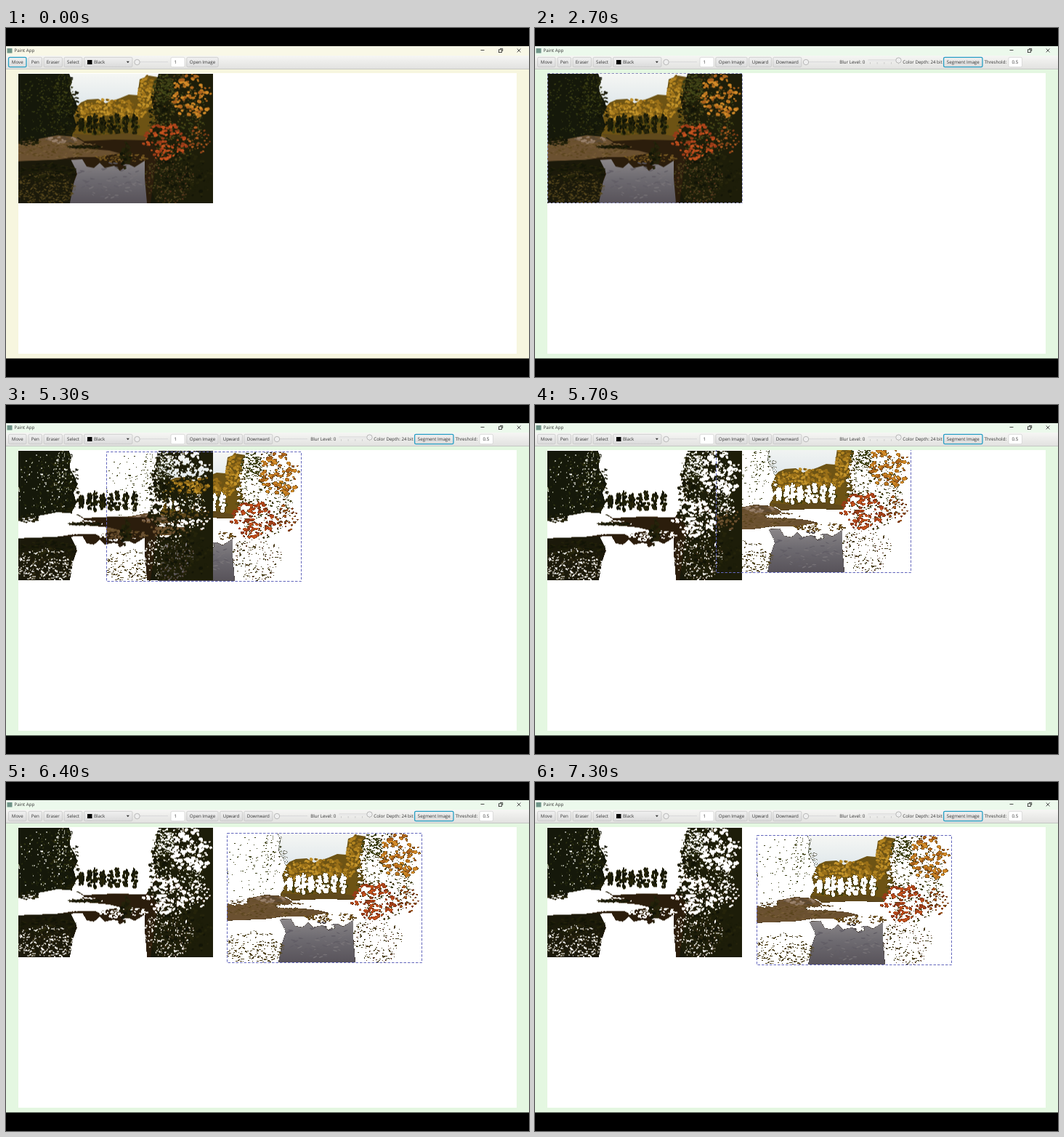
These frames come from a looping animation (720x480 px, 7700 ms). An HTML page with a canvas:

```html
<!DOCTYPE html>
<html lang="en">
<head>
<meta charset="utf-8">
<title>Paint App</title>
<style>
html, body { margin: 0; width: 100%; height: 100%; overflow: hidden; background: #000; }
canvas { display: block; }
</style>
</head>
<body>
<canvas id="stage" width="720" height="480"></canvas>
<script>
const LOOP = 7700, W = 268, H = 178, LEFT = 17, TOP = 62;
const g = document.getElementById('stage').getContext('2d');

let seed = 7;
function rand() {
  seed = (seed * 1664525 + 1013904223) >>> 0;
  return seed / 4294967296;
}

function newLayer() {
  const c = document.createElement('canvas');
  c.width = W;
  c.height = H;
  return c;
}

// Autumn lake: flat areas with leaf specks scattered in ellipses.
function paintPhoto() {
  const c = newLayer(), p = c.getContext('2d', { willReadFrequently: true });
  function area(color, ...pts) {
    p.fillStyle = color;
    p.beginPath();
    for (let i = 0; i < pts.length; i += 2) p.lineTo(pts[i], pts[i + 1]);
    p.fill();
  }
  function specks(n, x, y, rx, ry, colors, size, flat = 0.6) {
    for (let i = 0; i < n; i++) {
      const a = rand() * 2 * Math.PI, d = Math.sqrt(rand()), s = size * (0.4 + 0.6 * rand());
      p.fillStyle = colors[Math.floor(rand() * colors.length)];
      p.beginPath();
      p.ellipse(x + rx * d * Math.cos(a), y + ry * d * Math.sin(a), s, s * flat, rand() - 0.5, 0, 7);
      p.fill();
    }
  }
  const dark = ['#121407', '#1c1d09', '#25240b'];
  const green = ['#3f4417', '#494b1b', '#353b14'];
  const gold = ['#9a7019', '#b38420', '#7d5b14', '#c2932b'];
  const brown = ['#67502a', '#7a5f39', '#574219'];

  p.fillStyle = '#17180a';
  p.fillRect(0, 0, W, H);
  const sky = p.createLinearGradient(0, 0, 0, 45);
  sky.addColorStop(0, '#f6f7f4');
  sky.addColorStop(1, '#dfe7eb');
  area(sky, 69, 0, 195, 0, 190, 60, 75, 60, 80, 40, 72, 26);

  // Far trees
  area('#6d5314', 77, 50, 86, 40, 95, 36, 110, 35, 120, 41, 140, 34, 152, 29, 164, 30,
    167, 8, 180, 3, 192, 5, 192, 88, 74, 88);
  specks(330, 126, 52, 50, 17, gold, 2.6, 0.8);
  specks(130, 178, 27, 13, 24, gold, 2.5, 0.8);
  specks(150, 124, 73, 42, 14, ['#54430f', '#624d14', '#41400f'], 3, 1);
  for (const x of [86, 98, 106, 116, 127, 136, 148, 160])
    specks(34, x, 70, 4, 16 - rand() * 6, dark, 2, 1.4);

  // Left conifers
  area('#15180a', 0, 0, 70, 0, 74, 12, 68, 25, 76, 36, 82, 46, 76, 58, 80, 72, 72, 88, 0, 92);
  specks(130, 63, 46, 20, 48, dark, 3.2, 0.4);
  specks(220, 37, 48, 40, 46, green, 1.7, 0.45);
  specks(160, 62, 30, 14, 32, green, 1.5, 0.45);

  // Right wood
  area('#1d1d09', 193, 0, 268, 0, 268, 178, 190, 178, 174, 140, 172, 94, 190, 70, 184, 40);
  specks(160, 196, 52, 15, 48, dark, 3, 0.5);
  specks(480, 218, 60, 40, 60, ['#50491a', '#434819', '#5c4418'], 1.8);
  specks(130, 200, 20, 14, 19, green, 2);

  // Shore and water
  area('#2b1d0c', 70, 92, 115, 88, 176, 90, 192, 105, 182, 178, 70, 178, 55, 112);
  area('#60491c', 74, 83, 110, 85, 150, 82, 178, 87, 175, 92, 132, 91, 90, 93);
  area('#6b5131', 0, 94, 28, 90, 54, 85, 78, 87, 91, 95, 76, 102, 125, 106, 140, 110,
    108, 115, 76, 115, 52, 119, 0, 121);
  specks(220, 54, 104, 62, 12, brown, 3, 0.3);
  specks(35, 58, 91, 22, 4, ['#88715b', '#9a826c', '#5c4932'], 3.5, 0.5);
  specks(60, 14, 94, 15, 5, dark, 2.5, 0.45);
  specks(75, 92, 101, 24, 2, dark, 3, 0.3);
  specks(90, 142, 116, 37, 6, ['#60461a', '#806025', '#6d5120'], 2.5, 0.4);
  const water = p.createLinearGradient(0, 118, 0, 178);
  water.addColorStop(0, '#8b8789');
  water.addColorStop(0.45, '#6e6b71');
  water.addColorStop(1, '#58535a');
  area(water, 72, 119, 88, 118, 94, 128, 104, 130, 112, 123, 119, 130, 132, 127, 140, 134,
    152, 125, 160, 129, 174, 120, 174, 144, 177, 178, 70, 178, 76, 151, 81, 138);
  specks(70, 126, 147, 46, 25, ['#777377', '#625e66'], 4, 0.25);
  specks(40, 148, 113, 7, 18, dark, 3, 0.8);

  // Near grass and bushes
  area('#1b190a', 0, 121, 72, 118, 80, 134, 76, 152, 71, 178, 0, 178);
  specks(350, 36, 158, 43, 24, ['#57481c', '#655225', '#493f1a'], 2.2, 0.32);
  specks(110, 40, 136, 42, 13, dark, 4, 0.3);
  specks(350, 208, 145, 34, 35, ['#48401b', '#5c3920', '#544922'], 1.6, 0.6);
  specks(120, 232, 141, 35, 35, dark, 3, 0.7);

  // Coloured leaves
  specks(100, 240, 31, 30, 31, ['#bd7620', '#d28a28', '#aa611b'], 3.2, 0.75);
  specks(115, 203, 94, 31, 25, ['#ae451b', '#c4521e', '#963b18'], 3, 0.7);
  specks(35, 246, 92, 19, 18, ['#8b4219', '#ae5c20'], 2.4, 0.7);
  return c;
}

// Splits the photo by brightness into [light, dark] layers.
function segment(photo, threshold) {
  const data = photo.getContext('2d').getImageData(0, 0, W, H);
  return [false, true].map(wantDark => {
    const out = new ImageData(new Uint8ClampedArray(data.data), W, H), d = out.data;
    for (let i = 0; i < d.length; i += 4) {
      const lum = 0.3 * d[i] + 0.59 * d[i + 1] + 0.11 * d[i + 2];
      if ((lum < threshold) !== wantDark) d[i + 3] = 0;
    }
    const c = newLayer();
    c.getContext('2d').putImageData(out, 0, 0);
    return c;
  });
}

const photo = paintPhoto();
const [light, dark] = segment(photo, 52);

// Drag path of the light layer, one point per 100 ms
const DRAG = 5100;
const pathX = [34, 88, 138, 174, 205, 230, 249, 260, 266, 273, 281, 290, 298, 304, 304, 304, 305];
const pathY = [63, 64, 64, 64, 62, 59, 52, 52, 53, 55, 59, 63, 67, 70, 71, 72, 73];

function rect(x, y, w, h, fill) {
  g.fillStyle = fill;
  g.fillRect(x, y, w, h);
}
function line(color, ...pts) {
  g.strokeStyle = color;
  g.lineWidth = 0.8;
  g.beginPath();
  for (let i = 0; i < pts.length; i += 2) g.lineTo(pts[i], pts[i + 1]);
  g.stroke();
}
function text(s, x, y = 49.2) {
  g.fillStyle = '#333';
  g.fillText(s, x, y);
}
function box(x, w, fill, stroke, width = 0.7) {
  g.beginPath();
  g.roundRect(x, 40.3, w, 13.4, 1.8);
  g.fillStyle = fill;
  g.fill();
  g.strokeStyle = stroke;
  g.lineWidth = width;
  g.stroke();
}
function shade(y0, y1, a, b) {
  const s = g.createLinearGradient(0, y0, 0, y1);
  s.addColorStop(0, a);
  s.addColorStop(1, b);
  return s;
}
function button(label, x, w, focus) {
  box(x, w, shade(40, 54, '#f1f1f1', '#dadada'), focus ? '#279fc4' : '#c2c2c2', focus ? 1.3 : 0.7);
  g.textAlign = 'center';
  text(label, x + w / 2);
  g.textAlign = 'left';
}
function field(value, x, w) {
  box(x, w, '#fff', '#cfcfcf');
  text(value, x + 4.5);
}
function slider(x0, x1, y, thumb) {
  rect(x0, y - 1, x1 - x0, 1.8, '#d2d2d2');
  rect(x0, y - 0.3, x1 - x0, 1, '#eee');
  g.beginPath();
  g.arc(thumb, y, 3.7, 0, 7);
  g.fillStyle = '#efefef';
  g.fill();
  g.strokeStyle = '#aaa';
  g.lineWidth = 0.8;
  g.stroke();
}

function drawWindow(t) {
  const bg = t < 1000 ? '#f7f6df' : '#e4f7e1';
  rect(0, 0, 720, 480, '#000');
  rect(0, 25, 720, 429.5, bg);
  rect(0, 25, 720, 13, t < 1000 ? '#f9f8e7' : '#ecf9ec');
  rect(1.5, 28, 7, 6.5, '#6f9488');
  text('Paint App', 11.5, 33.3);
  line('#222', 653.5, 30.5, 658.5, 30.5);
  g.strokeRect(678.5, 29.8, 3.8, 3.8);
  line('#222', 680, 28.4, 683.7, 28.4, 683.7, 32);
  line('#222', 703.7, 28.5, 708.5, 33.3);
  line('#222', 708.5, 28.5, 703.7, 33.3);

  rect(0, 38, 720, 18, shade(38, 56, '#f6f6f4', '#e2e2e0'));
  rect(0, 56, 720, 0.8, '#bdbdbd');
  button('Move', 3.5, 24.5, t < 2600);
  button('Pen', 31, 18.5);
  button('Eraser', 52, 25.5);
  button('Select', 80, 25);
  button('', 107.5, 66.5);
  rect(112, 44, 6.5, 6, '#000');
  text('Black', 121);
  g.beginPath();
  g.moveTo(165.8, 45.8);
  g.lineTo(169.8, 45.8);
  g.lineTo(167.8, 48.2);
  g.fill();
  slider(178, 223, 47, 180.5);
  field('1', 227, 19);
  button('Open Image', 248.8, 43.4);
  if (t >= 2300) {
    button('Upward', 294.5, 31);
    button('Downward', 327.7, 39.2);
    slider(370, 415, 47, 373);
    text('Blur Level: 0', 419.3);
    for (let i = 0; i < 5; i++) rect(461 + i * 9.8, 47, 0.6, 2.5, '#b5b5b5');
    slider(458.5, 504, 44.5, 500.5);
    text('Color Depth: 24 bit', 506.3);
    button('Segment Image', 562.6, 53.4, t >= 2700);
    text('Threshold:', 618.5);
    field('0.5', 652, 18.5);
  }
  rect(LEFT, TOP, 686, 386, '#fff');
}

function selection(x, y, color) {
  g.strokeStyle = color;
  g.lineWidth = 1;
  g.setLineDash([3.5, 2]);
  g.strokeRect(x + 0.5, y + 0.5, W, H);
  g.setLineDash([]);
}

function draw(t) {
  g.font = '6.2px "Open Sans", "Noto Sans", sans-serif';
  g.textRendering = 'geometricPrecision';
  drawWindow(t);
  g.save();
  g.beginPath();
  g.rect(LEFT, TOP, 686, 386);
  g.clip();
  if (t < DRAG) {
    g.drawImage(photo, LEFT, TOP + 0.5);
    if (t >= 2300) selection(LEFT, TOP, '#8f91bd');
  } else {
    const i = Math.min(Math.floor((t - DRAG) / 100), pathX.length - 1);
    g.drawImage(light, pathX[i], pathY[i]);
    g.drawImage(dark, LEFT, TOP + 0.5);
    selection(pathX[i], pathY[i], '#6468bd');
  }
  g.restore();
}

function frame() {
  draw(performance.now() % LOOP);
  requestAnimationFrame(frame);
}
frame();
</script>
</body>
</html>
```
